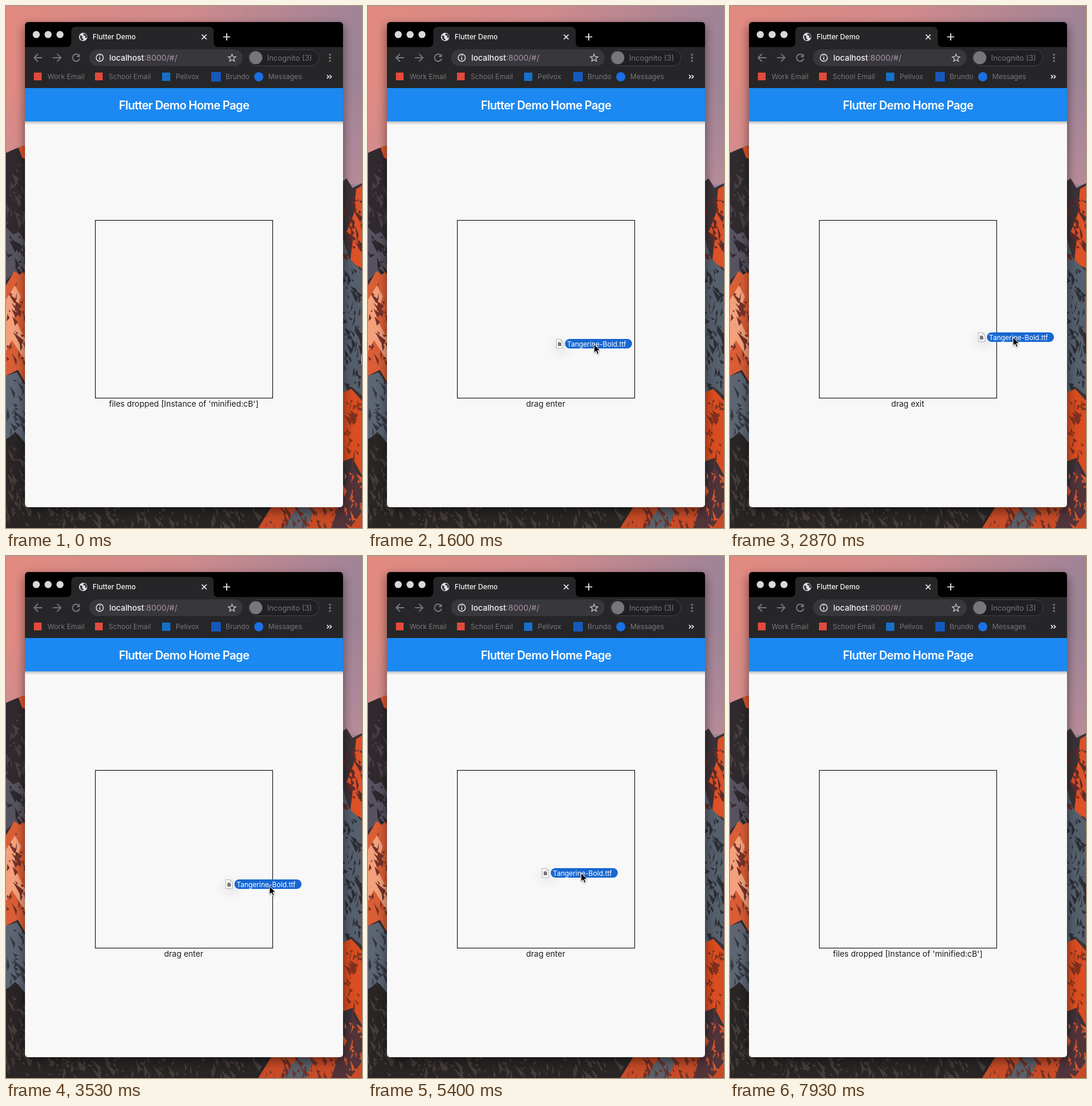
An HTML page that plays this animation: 600x878 px, repeating every 8000 ms.

```html
<!DOCTYPE html>
<html lang="en">
<head>
<meta charset="utf-8">
<title>File drop demo</title>
<style>
  html, body { margin: 0; width: 100%; height: 100%; overflow: hidden; background: #2a2526; }
  svg { display: block; width: 100vw; height: 100vh; }
  text { font-family: Inter, "Open Sans", sans-serif; }
  .line { fill: none; stroke: currentColor; stroke-width: 2; }
  .small { font-size: 11.8px; fill: currentColor; }
  .status { font-size: 13.5px; text-anchor: middle; fill: #1c1c1c; }

  .chrome { animation: chrome 8s infinite step-end; }
  .more { animation: more 8s infinite step-end; }
  .light { fill: #d8d8d8; animation: light 8s infinite step-end; }
  .glow { animation: glow 8s infinite step-end; }
  .dropped { animation: dropped 8s infinite step-end; }
  .enter { animation: enter 8s infinite step-end; }
  .exit { animation: exit 8s infinite step-end; }
  .drag { animation: drag 8s infinite step-end; }
  .pointer { animation: pointer 8s infinite ease-in-out; }
  .ghost { animation: ghost 8s infinite ease-in-out; }

  @keyframes chrome { 0%, 93% { color: #77777b; } 70.5% { color: #f0f0f2; } }
  @keyframes more { 0%, 93% { color: #f0f0f2; } 70.5% { color: #b4b4b8; } }
  @keyframes light { 0%, 93% { fill: #d8d8d8; } 70.5% { fill: var(--lit); } }
  @keyframes glow { 0%, 93% { opacity: 0; } 70.5% { opacity: .4; } }
  @keyframes dropped { 0%, 70% { opacity: 1; } 14.4% { opacity: 0; } }
  @keyframes enter { 0%, 29.4%, 70% { opacity: 0; } 14.4%, 38.25% { opacity: 1; } }
  @keyframes exit { 0%, 38.25% { opacity: 0; } 29.4% { opacity: 1; } }
  @keyframes drag { 0% { opacity: 1; } 70%, 100% { opacity: 0; } }

  @keyframes pointer {
    0%, 7.5% { transform: translate(660px, 596px); }
    17% { transform: translate(388px, 571px); }
    20%, 25% { transform: translate(381px, 569px); }
    32.5% { transform: translate(512px, 560px); }
    35.875% { transform: translate(477px, 557px); }
    40% { transform: translate(432px, 555px); }
    44.125% { transform: translate(444px, 555px); }
    50% { transform: translate(428px, 553px); }
    58.375% { transform: translate(380px, 550px); }
    67%, 79.125% { transform: translate(359px, 533px); }
    82% { transform: translate(364px, 534px); }
    90%, 100% { transform: translate(660px, 560px); }
  }
  @keyframes ghost {
    0%, 7.5% { transform: translate(614px, 587px); }
    17% { transform: translate(340px, 562px); }
    20%, 25% { transform: translate(332px, 560px); }
    32.5% { transform: translate(461px, 551px); }
    35.875% { transform: translate(433px, 549px); }
    40% { transform: translate(381px, 546px); }
    44.125% { transform: translate(385px, 544px); }
    50% { transform: translate(378px, 544px); }
    58.375% { transform: translate(329px, 542px); }
    67%, 100% { transform: translate(308px, 525px); }
  }
</style>
</head>
<body>
<svg viewBox="0 0 600 878" preserveAspectRatio="none">
  <defs>
    <linearGradient id="sky" x2="1" y2=".15">
      <stop stop-color="#e28a80"/><stop offset=".5" stop-color="#cf8a8c"/><stop offset="1" stop-color="#9c8398"/>
    </linearGradient>
    <linearGradient id="haze" x2="0" y2="1">
      <stop stop-color="#c58f9a" stop-opacity="0"/><stop offset="1" stop-color="#c58f9a" stop-opacity=".65"/>
    </linearGradient>
    <linearGradient id="barShade" x2="0" y2="1">
      <stop stop-opacity=".24"/><stop offset="1" stop-opacity="0"/>
    </linearGradient>
    <radialGradient id="puff"><stop stop-opacity=".05"/><stop offset="1" stop-opacity="0"/></radialGradient>
    <filter id="soft" x="-20%" y="-20%" width="140%" height="140%"><feGaussianBlur stdDeviation="8"/></filter>
    <filter id="pointerShade" x="-50%" y="-50%" width="200%" height="200%">
      <feDropShadow dx="0" dy="1" stdDeviation="1" flood-opacity=".4"/>
    </filter>
    <clipPath id="window"><rect x="32" y="27" width="536" height="816" rx="5"/></clipPath>
  </defs>

  <!-- Mountain backdrop -->
  <rect width="600" height="878" fill="url(#sky)"/>
  <rect y="120" width="600" height="180" fill="url(#haze)"/>
  <path d="M0 247L16 240 30 235 60 240V900H0Z" fill="#302a2e"/>
  <path d="M21 238L34 234V258L27 255Z" fill="#e0562e"/>
  <path d="M0 372L12 384 22 380 34 400V470L14 448 0 462Z" fill="#57525f"/>
  <path d="M0 470L14 446 24 452 34 440V636L20 612 0 622Z" fill="#d95e36"/>
  <path d="M0 494L15 470 25 488 14 524 32 560V596L10 562 0 580Z" fill="#f3a17c"/>
  <path d="M0 622L18 616 34 640V742L16 716 0 730Z" fill="#5d6573"/>
  <path d="M0 728L20 720 40 745 120 840 300 838 460 840 430 878H0Z" fill="#292525"/>
  <path d="M560 300L574 290 584 306 600 298V878H560Z" fill="#3a3237"/>
  <path d="M590 308L600 302V442L580 430 584 396 574 380 586 350Z" fill="#dd5127"/>
  <path d="M568 392L578 424 600 446V655L582 640 568 652Z" fill="#56606d"/>
  <path d="M568 650L582 644 600 664V790L584 760 568 766Z" fill="#d94d21"/>
  <path d="M425 878L450 838H600V878Z" fill="#c74b26"/>
  <path d="M466 878L492 842 520 845 506 878Z" fill="#59606a"/>
  <path d="M560 842L584 770 600 800V850L580 878H548Z" fill="#51333a"/>
  <g id="rocks"></g>

  <!-- Browser window -->
  <rect x="30" y="32" width="540" height="818" rx="8" opacity=".42" filter="url(#soft)"/>
  <rect class="glow" x="26" y="38" width="548" height="824" rx="10" filter="url(#soft)"/>
  <g clip-path="url(#window)">
    <path fill="#f8f8f8" d="M32 27H568V843H32Z"/>
    <path d="M32 27H568V69H32Z"/>
    <path d="M102 69Q110 69 110 61V43Q110 35 118 35H342Q350 35 350 43V61Q350 69 358 69H568V138H32V69Z" fill="#262628"/>
    <path d="M32 194H568V200H32Z" fill="url(#barShade)"/>
    <path d="M32 138H568V194H32Z" fill="#1b89f1"/>
  </g>
  <circle class="light" cx="51" cy="48" r="6" style="--lit:#fc6040"/>
  <circle class="light" cx="71" cy="48" r="6" style="--lit:#fb8632"/>
  <circle class="light" cx="91" cy="48" r="6" style="--lit:#2ca744"/>

  <g color="#f0f0f2">
    <circle cx="130" cy="52" r="7" fill="#e1e2e5"/>
    <path d="M125 49L129 51 128 54 131 56 129 58Q124 56 125 49ZM131 46L130 49 134 50 133 53 136 54Q138 48 131 46Z" fill="#303135"/>
    <text x="146" y="56" font-size="11.8" font-weight="500" fill="#f4f4f5">Flutter Demo</text>
    <path class="line" d="M330 48L338 56M338 48L330 56M366 52H378M372 46V58" style="stroke-width:1.7"/>
    <rect x="140" y="73" width="259" height="28" rx="14" fill="#38373c"/>
    <circle class="line" cx="158" cy="87" r="6" style="stroke-width:1.4"/>
    <path class="line" d="M158 86V90.5M158 83V84.5" style="stroke-width:1.5"/>
    <text x="174" y="92" font-size="13.5" fill="#a995a9"><tspan fill="#f4f4f5" font-weight="500">localhost</tspan>:8000/#/</text>
    <path class="line" d="M381 81L382.8 85.2 387.3 85.5 383.8 88.4 385 92.8 381 90.4 377 92.8 378.2 88.4 374.7 85.5 379.2 85.2Z" style="stroke-width:1.3;stroke:#c5c5ca"/>
  </g>
  <path class="line" d="M79 87H92M86 80.5L92.5 87 86 93.5" color="#707074"/>
  <rect x="408.5" y="73.5" width="119" height="27" rx="13.5" fill="#202023" stroke="#414146"/>

  <g class="chrome">
    <path class="line" d="M61 87H48M54 80.5L47.5 87 54 93.5M123 83.5A6 6 0 1 0 124 88.5"/>
    <path d="M124.5 80V86H118.5Z" fill="currentColor"/>
    <circle cx="421" cy="87" r="11" fill="currentColor"/>
    <text x="440" y="92" font-size="12.6" fill="currentColor">Incognito (3)</text>
    <g fill="currentColor">
      <circle cx="546" cy="82" r="1.7"/><circle cx="546" cy="87.2" r="1.7"/><circle cx="546" cy="92.4" r="1.7"/>
    </g>
    <g class="small">
      <text x="70" y="123">Work Email</text>
      <text x="173" y="123">School Email</text>
      <text x="286" y="123">Pelivox</text>
      <text x="370" y="123">Brundo</text>
      <text x="442" y="123">Messages</text>
    </g>
  </g>
  <path class="line more" d="M541 116L544 119 541 122M545.5 116L548.5 119 545.5 122" style="stroke-width:1.6"/>
  <path d="M47 112H60V125H47ZM150 112H163V125H150Z" fill="#e24a3b"/>
  <path d="M263 112H277V126H263Z" fill="#176fc9"/>
  <path d="M346 111H362V127H346Z" fill="#1559bd"/>
  <circle cx="426" cy="119" r="7.7" fill="#1a70e4"/>

  <!-- Page -->
  <text x="300" y="174" font-size="19.5" font-weight="600" letter-spacing="-.65" text-anchor="middle" fill="#fff">Flutter Demo Home Page</text>
  <rect x="150.5" y="360.5" width="299" height="299" fill="none" stroke="#000"/>
  <g class="status">
    <text class="dropped" x="299.5" y="674">files dropped [Instance of 'minified:cB']</text>
    <text class="enter" x="299.5" y="674">drag enter</text>
    <text class="exit" x="299.5" y="674">drag exit</text>
  </g>

  <!-- Dragged file and pointer -->
  <g class="drag">
    <g class="ghost">
      <ellipse cx="-6" cy="14" rx="26" ry="22" fill="url(#puff)"/>
      <path d="M-14.5 .5H-7L-3.5 4V15.5H-14.5Z" fill="#fff" stroke="#b5b5b8"/>
      <path d="M-7 .5V4H-3.5" fill="none" stroke="#b5b5b8"/>
      <path d="M-12 6L-9 5 -6 7V12H-12Z" fill="#77777d"/>
      <rect width="113" height="16" rx="8" fill="#1767d2"/>
      <text x="3.5" y="12.5" font-size="11.6" fill="#fff">Tangerine-Bold.ttf</text>
    </g>
  </g>
  <g class="pointer">
    <path d="M0 0V14.5L3.4 11.4 5.7 16.7 8.2 15.6 5.9 10.5H10.3Z" stroke="#fff" filter="url(#pointerShade)"/>
  </g>
</svg>
<script>
  let seed = 11;
  const random = () => (seed = seed * 16807 % 2147483647) / 2147483647;
  const rocks = document.getElementById('rocks');

  // Scatter slanted shards of one colour over a patch of rock.
  function scatter(x, y, width, height, color, count) {
    let d = '';
    for (let i = 0; i < count; i++) {
      const length = 4 + random() ** 2 * 22, lean = (random() - .3) * length, thick = 1 + random() * 5;
      d += `M${x + random() * width} ${y + random() * height}l${lean} ${length}l${thick} ${-length * .4}Z`;
    }
    const path = document.createElementNS('http://www.w3.org/2000/svg', 'path');
    path.setAttribute('d', d);
    path.setAttribute('fill', color);
    rocks.append(path);
  }

  scatter(0, 265, 32, 100, '#4b4147', 36);
  scatter(0, 380, 32, 65, '#2c272d', 26);
  scatter(0, 455, 32, 145, '#76322a', 40);
  scatter(0, 625, 32, 85, '#343842', 26);
  scatter(0, 740, 32, 130, '#453d3a', 44);
  scatter(30, 838, 390, 34, '#453d3a', 120);
  scatter(440, 840, 120, 32, '#6d3027', 36);
  scatter(566, 315, 34, 110, '#5d2c29', 36);
  scatter(566, 435, 34, 200, '#2b2e36', 75);
  scatter(566, 655, 34, 100, '#80301f', 34);
  scatter(564, 780, 34, 90, '#d3572f', 28);
</script>
</body>
</html>
```
